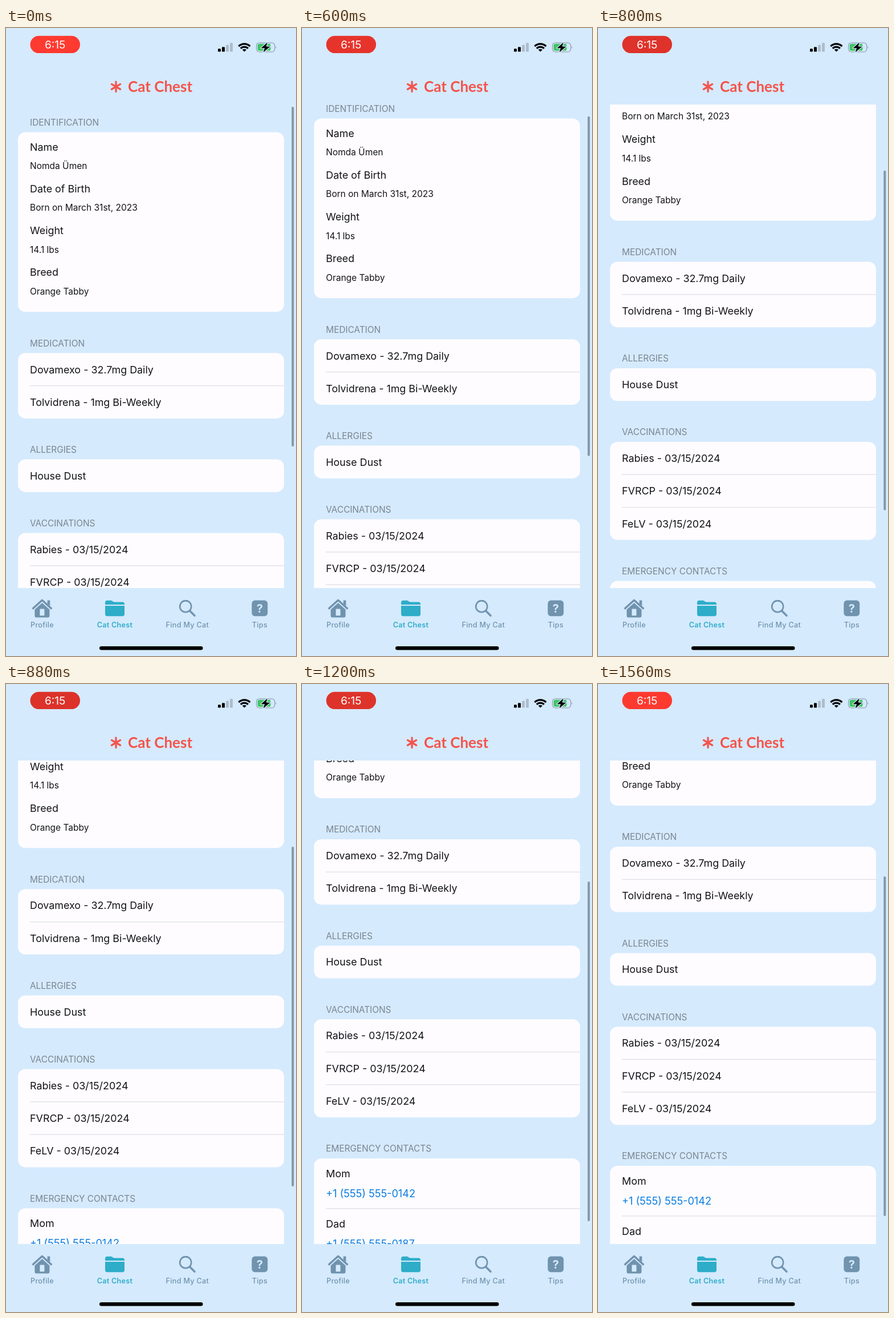
Recreate the animation shown at these times as an HTML page. Size 509 by 1100 pixels, loop 1600 ms.

```html
<!DOCTYPE html>
<html lang="en">
<head>
<meta charset="utf-8">
<title>Cat Chest</title>
<style>
html, body { margin: 0; height: 100%; overflow: hidden; background: #d5eafd; }
svg { display: block; width: 100vw; height: 100vh; font-family: Inter, "Liberation Sans", sans-serif; }
.row { font-size: 17.9px; fill: #131317; }
.small { font-size: 15.5px; fill: #131317; }
.head { font-size: 15.4px; fill: #7b8590; }
.link { font-size: 18.1px; fill: #0a7de0; }
.card { fill: #fefcff; }
.rule { stroke: #dedee3; stroke-width: 1.2; }
.tab { font-size: 12.6px; font-weight: 500; letter-spacing: .3px; text-anchor: middle; fill: #7093ae; }
.on { font-weight: 600; fill: #2fadc8; }
.title { font: 700 26px Lato, sans-serif; fill: #f4544b; }
</style>
</head>
<body>
<svg viewBox="0 0 509 1100">
  <clipPath id="view"><rect y="134" width="509" height="847"/></clipPath>
  <g clip-path="url(#view)"><g id="list"></g></g>
  <rect id="bar" x="501.3" y="138" width="4" height="595" rx="2" fill="#8497a8"/>

  <!-- status bar -->
  <rect id="pill" x="42.5" y="13.7" width="87.5" height="30.4" rx="15.2"/>
  <text x="86.2" y="36.2" font-size="19.2" fill="#fff" text-anchor="middle">6:15</text>
  <rect x="372" y="36.3" width="5" height="5.2" rx="1.2"/>
  <rect x="379" y="33.3" width="5" height="8.2" rx="1.2"/>
  <g fill="#adbdcc">
    <rect x="386" y="29.6" width="5" height="11.9" rx="1.2"/>
    <rect x="393" y="26" width="5" height="15.5" rx="1.2"/>
  </g>
  <g fill="none" stroke="#000" stroke-width="3.2">
    <path d="M408.4 32 A14.2 14.2 0 0 1 428.4 32"/>
    <path d="M411.9 35.8 A9.2 9.2 0 0 1 424.9 35.8"/>
  </g>
  <path d="M418.4 41.6 L414.8 38.2 A5 5 0 0 1 422 38.2Z"/>
  <rect x="439.6" y="25.8" width="32" height="16" rx="5" fill="none" stroke="#94a3b0" stroke-width="1.3"/>
  <path d="M473.2 31.2 q2 2.6 0 5.2Z" fill="#94a3b0"/>
  <rect x="441.6" y="27.8" width="23" height="12" rx="3" fill="#3cc663"/>
  <path d="M458.6 25.2 L447.6 35.2 H454 L451.8 42.6 L463.6 32.4 H456.8Z" stroke="#d5eafd" stroke-width="2.4" paint-order="stroke" stroke-linejoin="round"/>

  <!-- title -->
  <path d="M193 94.2 V111.4 M185.4 98.4 L200.6 107.2 M185.4 107.2 L200.6 98.4" stroke="#f4544b" stroke-width="3.3" stroke-linecap="round"/>
  <text class="title" x="214" y="111.5">Cat Chest</text>

  <!-- tab bar -->
  <g fill="#7093ae">
    <path d="M72.6 1002.4 h4.6 v10 l-4.6 -4Z"/>
    <path d="M47.6 1016.6 L63.4 1002.3 L79.2 1016.6" fill="none" stroke="#7093ae" stroke-width="3.4" stroke-linecap="round" stroke-linejoin="round"/>
    <path d="M50.4 1018.6 L63.4 1007 L76.4 1018.6 V1030 q0 2.4 -2.4 2.4 H52.8 q-2.4 0 -2.4 -2.4Z"/>
    <rect x="59.4" y="1017.6" width="8" height="11.6" rx=".8" fill="#d5eafd"/>
    <rect x="431.4" y="1002.6" width="27.8" height="27.6" rx="5.5"/>
  </g>
  <text x="445.3" y="1023.6" font-size="20" font-weight="700" text-anchor="middle" fill="#d5eafd">?</text>
  <g fill="#2fadc8">
    <path d="M174 1010 V1006.4 q0 -3.6 3.6 -3.6 H184 q1.6 0 2.8 1 l1.2 1 q1 .8 2.4 .8 H204.4 q3.6 0 3.6 3.6 v.8Z"/>
    <path d="M174 1012 H208 V1026.6 q0 3.6 -3.6 3.6 H177.6 q-3.6 0 -3.6 -3.6Z"/>
  </g>
  <g fill="none" stroke="#7093ae" stroke-linecap="round">
    <circle cx="315.2" cy="1013.2" r="10" stroke-width="2.7"/>
    <path d="M322.8 1021 L331 1029.3" stroke-width="3.5"/>
  </g>
  <text class="tab" x="63.5" y="1050.3">Profile</text>
  <text class="tab on" x="191" y="1050.3">Cat Chest</text>
  <text class="tab" x="318.3" y="1050.3">Find My Cat</text>
  <text class="tab" x="445.4" y="1050.3">Tips</text>
  <rect x="164" y="1083" width="181.5" height="6.4" rx="3.2"/>
</svg>
<script>
const LOOP = 1600, STEP = 40, ROW = 57.3;
const $ = id => document.getElementById(id);

const text = (kind, y, s) => `<text class="${kind}" x="42" y="${y}">${s}</text>`;
const rule = y => `<path class="rule" d="M42 ${y} H488"/>`;
const card = (title, y, h, body) => text("head", y - 11.6, title) +
  `<rect class="card" x="21" y="${y}" width="467" height="${h}" rx="13"/>` + body;
const rows = (title, y, items) => card(title, y, items.length * ROW,
  items.map((s, i) => (i ? rule(y + i * ROW) : "") + text("row", y + i * ROW + 35.2, s)).join(""));
const pairs = (list, y, pitch, gap, kind) => list.map(([a, b], i) =>
  text("row", y + i * pitch, a) + text(kind, y + i * pitch + gap, b)).join("");

const facts = [["Name", "Nomda Ümen"], ["Date of Birth", "Born on March 31st, 2023"],
  ["Weight", "14.1 lbs"], ["Breed", "Orange Tabby"]];
const contacts = [["Mom", "+1 (555) 555-0142"], ["Dad", "+1 (555) 555-0187"]];

$("list").innerHTML =
  card("IDENTIFICATION", 182.5, 314.8, pairs(facts, 214.5, 73.3, 32.4, "small")) +
  rows("MEDICATION", 569.3, ["Dovamexo - 32.7mg Daily", "Tolvidrena - 1mg Bi-Weekly"]) +
  rows("ALLERGIES", 755.6, ["House Dust"]) +
  rows("VACCINATIONS", 884.6, ["Rabies - 03/15/2024", "FVRCP - 03/15/2024", "FeLV - 03/15/2024"]) +
  card("EMERGENCY CONTACTS", 1128.3, 176, rule(1216.2) + pairs(contacts, 1161.4, 88, 35, "link"));

// Smooth curve through [time, value] points that never overshoots them.
function curve(pts) {
  const slope = i => (pts[i + 1][1] - pts[i][1]) / (pts[i + 1][0] - pts[i][0]);
  const tangent = i => {
    if (!i || i === pts.length - 1) return slope(i ? i - 1 : 0);
    const a = slope(i - 1), b = slope(i);
    return a * b > 0 ? 2 * a * b / (a + b) : 0;
  };
  return t => {
    let i = 0;
    while (i < pts.length - 2 && t >= pts[i + 1][0]) i++;
    const [t0, a] = pts[i], [t1, b] = pts[i + 1], d = t1 - t0, u = (t - t0) / d, v = 1 - u;
    return v * v * ((1 + 2 * u) * a + u * d * tangent(i)) +
           u * u * ((1 + 2 * v) * b - v * d * tangent(i + 1));
  };
}

const scroll = curve([[0, 0], [520, 0], [600, 24], [680, 77.3], [800, 159.7], [1000, 266.6],
  [1200, 297.3], [1320, 298.5], [1420, 297], [1560, 284.3]]);
const dim = curve([[0, 0], [360, .26], [680, .83], [900, 1], [1200, .93], [1560, .05]]);

function draw(now) {
  const t = Math.floor(now % LOOP / STEP) * STEP;
  const y = scroll(t), k = dim(t);
  $("list").setAttribute("transform", `translate(0 ${-y})`);
  $("bar").setAttribute("y", 138 + y * .7);
  $("pill").setAttribute("fill", `rgb(${255 - 35 * k}, ${58 - 8 * k}, ${48 - 6 * k})`);
  requestAnimationFrame(draw);
}
draw(0);
</script>
</body>
</html>
```
